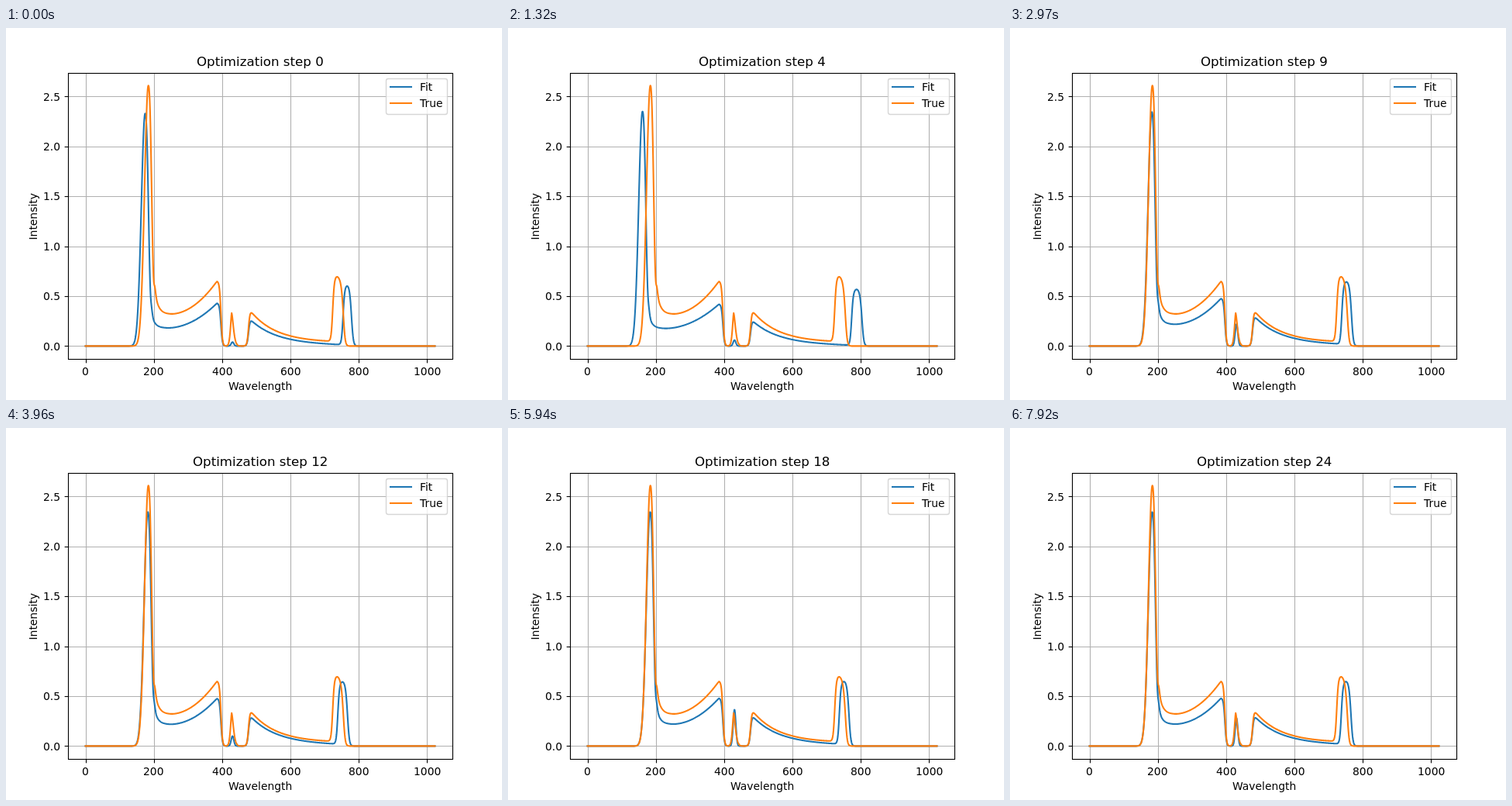
An HTML page with a canvas for the animation above (8 s loop, 640 px wide and 480 px high).

```html
<!DOCTYPE html>
<html lang="en">
<head>
<meta charset="utf-8">
<title>Optimization steps</title>
<style>
  html, body { margin: 0; width: 100%; height: 100%; overflow: hidden; background: #fff; }
  canvas { display: block; width: 640px; height: 480px; }
</style>
</head>
<body>
<canvas id="plot" width="640" height="480"></canvas>
<script>
const ctx = document.getElementById('plot').getContext('2d');
const LOOP = 8000, STEP = 330, STEPS = 25, LAST = 1023;
const BLUE = '#1f77b4', ORANGE = '#ff7f0e', GRID = '#b0b0b0', BLACK = '#000';
const SMALL = '13.89px "DejaVu Sans", sans-serif';
const LARGE = '16.67px "DejaVu Sans", sans-serif';

const px = x => 102.545 + x * 0.44077;
const py = y => 410.4 - y * 128.8;
const snap = v => Math.floor(v + 0.5) + 0.5;
const LEFT = snap(80), RIGHT = snap(576), TOP = snap(57.6), BOTTOM = snap(427.2);

const lerp = (a, b, u) => a + (b - a) * u;
const clamp = u => Math.min(1, Math.max(0, u));
const blend = (a, b, u) => Object.fromEntries(Object.keys(a).map(k => [k, lerp(a[k], b[k], u)]));
const rise = (d, width) => 1 / (1 + Math.exp(-d / width));
const bump = (d, left, right, power) => Math.exp(-((Math.abs(d) / (d < 0 ? left : right)) ** power));

// Main peak at c of height h, ramp from low to high, decay scaled by tail and
// reduced by droop, hump at hc of height hh reaching hl left and hr right
const TRUE = { c: 184, h: 2.61, low: .319, high: .65, tail: 1, droop: 0, hc: 735.5, hh: .697, hl: 12, hr: 20 };
const START = { c: 174.6, h: 2.33, low: .18, high: .43, tail: .75, droop: .017, hc: 767, hh: .61, hl: 13.2, hr: 12 };
const AWAY = { c: 161, h: 2.35, low: .175, high: .42, tail: .72, droop: .017, hc: 788, hh: .57, hl: 15, hr: 16 };
const FINAL = { c: 183.4, h: 2.345, low: .218, high: .48, tail: .85, droop: .017, hc: 751, hh: .65, hl: 14, hr: 15 };

const trueMiddle = x => .33 * bump(x - 428, 5, 7.5, 1.5);
const fitMiddle = (x, height) => height * bump(x - 430.4, 5.5, 5.5, 2);
const MIDDLE_KEYS = [[0, .04], [4, .06], [7, .3], [12, .1], [16, .25], [20, .48], [24, .28]];

function middleHeight(step) {
  const i = Math.max(1, MIDDLE_KEYS.findIndex(([s]) => s >= step));
  const [s0, h0] = MIDDLE_KEYS[i - 1], [s1, h1] = MIDDLE_KEYS[i];
  return lerp(h0, h1, (step - s0) / (s1 - s0));
}

// The fit first strays from the start, then turns back and settles
function fitState(step) {
  if (step <= 4) return blend(START, AWAY, clamp((step - 1) / 3));
  if (step <= 12) return blend(AWAY, FINAL, .96 * clamp((step - 4) / 2));
  return FINAL;
}

function mainPeak(x, p) {
  const d = x - p.c;
  return p.h * (d < 0 ? bump(d, 15.6, 1, 2) : bump(d, 1, 12.7, 2.5));
}

function ramp(x, p) {
  const d = x - p.c;
  const u = clamp((d - 62) / (385 - p.c - 62));
  const shoulder = 1 + .9 * Math.exp(-(d - 16) / 11);
  return lerp(p.low * shoulder, p.high, u * u) * rise(d - 17, 1.5) * rise(396.5 - x, 2.2);
}

function decay(x, p) {
  const d = x - 487;
  const level = p.tail * (.035 + .3 * Math.exp(-d / 75)) - p.droop * d / 233;
  return level * rise(x - 477.5, 2.2) * rise(p.hc - p.hl - x, 2);
}

function hump(x, p) {
  const d = x - p.hc;
  return p.hh * Math.max(0, 1 - d * d / 2000) * rise(d + p.hl, 2.3) * rise(p.hr - d, 2.8);
}

function spectrum(p, middle) {
  return Array.from({ length: LAST + 1 }, (_, x) =>
    mainPeak(x, p) + ramp(x, p) + middle(x) + decay(x, p) + hump(x, p));
}

function line(x0, y0, x1, y1, color, width = 1.11) {
  ctx.strokeStyle = color;
  ctx.lineWidth = width;
  ctx.beginPath();
  ctx.moveTo(x0, y0);
  ctx.lineTo(x1, y1);
  ctx.stroke();
}

// Starts on a whole pixel; anchor is 0 for left, .5 for centre, 1 for right
function text(s, x, y, anchor, font = SMALL) {
  ctx.font = font;
  ctx.fillStyle = BLACK;
  ctx.fillText(s, Math.round(x - anchor * ctx.measureText(s).width), y);
}

function curve(ys, color) {
  ctx.strokeStyle = color;
  ctx.lineWidth = 2.083;
  ctx.lineJoin = 'round';
  ctx.lineCap = 'square';
  ctx.beginPath();
  ys.forEach((y, x) => ctx.lineTo(px(x), py(y)));
  ctx.stroke();
  ctx.lineCap = 'butt';
}

function drawAxes() {
  for (let v = 0; v <= 1000; v += 200) {
    const x = snap(px(v));
    line(x, TOP, x, BOTTOM, GRID);
    line(x, BOTTOM, x, BOTTOM + 4.86, BLACK);
    text(String(v), px(v), 448, .5);
  }
  for (let v = 0; v <= 2.5; v += .5) {
    const y = snap(py(v));
    line(LEFT, y, RIGHT, y, GRID);
    line(LEFT - 4.86, y, LEFT, y, BLACK);
    text(v.toFixed(1), 70.3, Math.round(py(v) + 5.3), 1);
  }
  text('Wavelength', 328, 467, .5);
  ctx.save();
  ctx.translate(40, 243.5);
  ctx.rotate(-Math.PI / 2);
  text('Intensity', 0, 0, .5);
  ctx.restore();
}

function drawFrame() {
  ctx.strokeStyle = BLACK;
  ctx.lineWidth = 1.11;
  ctx.lineJoin = 'miter';
  ctx.strokeRect(LEFT, TOP, RIGHT - LEFT, BOTTOM - TOP);
}

function legendEntry(name, color, y) {
  line(495, y, 524, y, color, 2.083);
  text(name, 534, y + 5, 0);
}

function drawLegend() {
  ctx.beginPath();
  ctx.roundRect(490.5, 65.5, 79, 46, 2.8);
  ctx.fillStyle = 'rgba(255,255,255,.8)';
  ctx.fill();
  ctx.strokeStyle = 'rgba(204,204,204,.8)';
  ctx.lineWidth = 1.39;
  ctx.stroke();
  legendEntry('Fit', BLUE, 76);
  legendEntry('True', ORANGE, 97);
}

const trueCurve = spectrum(TRUE, trueMiddle);
const fits = Array.from({ length: STEPS }, (_, step) => {
  const height = middleHeight(step);
  return spectrum(fitState(step), x => fitMiddle(x, height));
});

function draw() {
  const step = Math.floor(performance.now() % LOOP / STEP);
  ctx.fillStyle = '#fff';
  ctx.fillRect(0, 0, 640, 480);
  drawAxes();
  curve(fits[step], BLUE);
  curve(trueCurve, ORANGE);
  drawFrame();
  drawLegend();
  text('Optimization step ' + step, 328, 49, .5, LARGE);
  requestAnimationFrame(draw);
}
draw();
</script>
</body>
</html>
```
